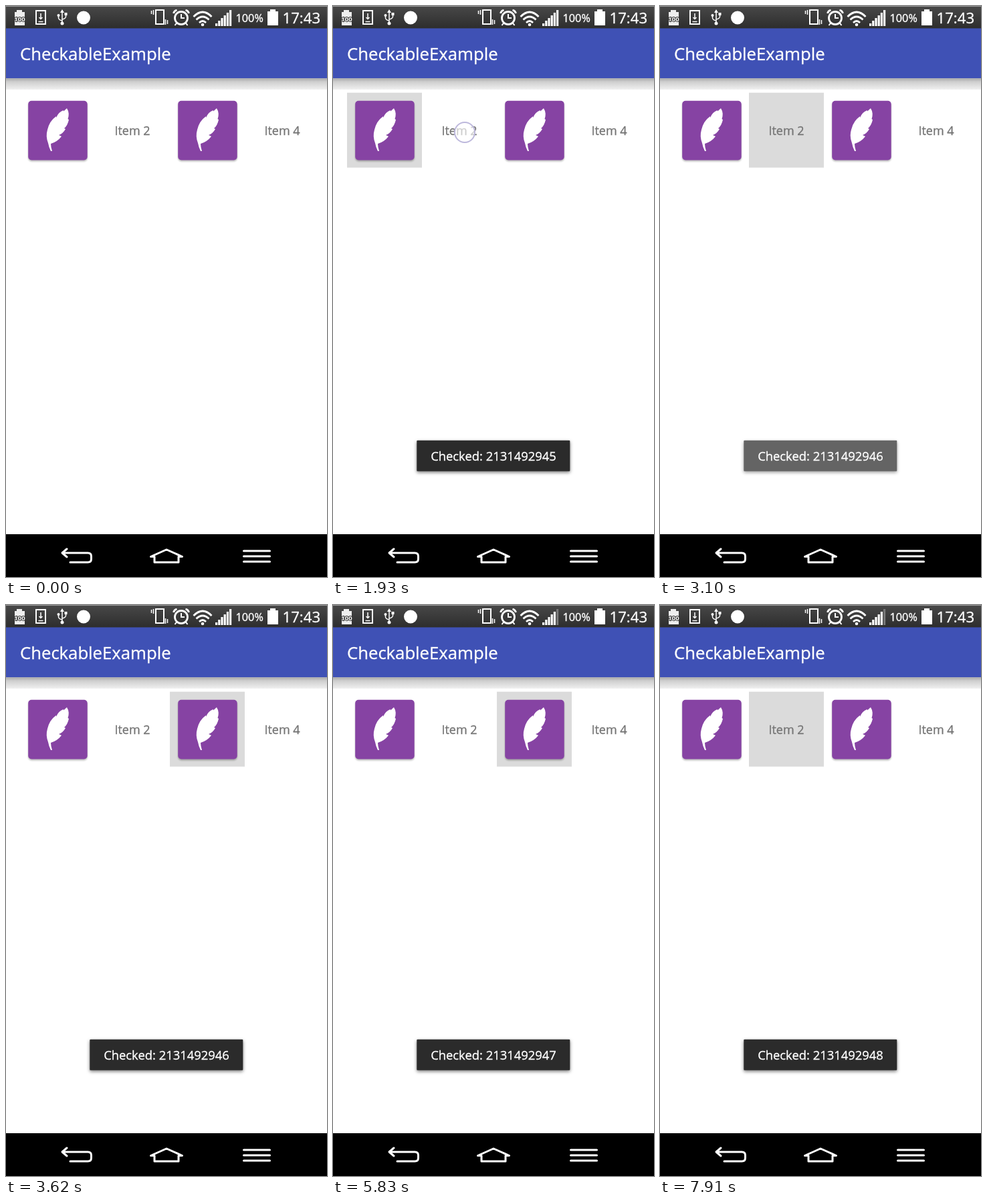
Write an HTML page that moves like this. It is 480 px wide and 854 px high and loops after 8 s.

```html
<!DOCTYPE html>
<html lang="en">
<head>
<meta charset="utf-8">
<title>Checkable items</title>
<style>
  html, body { margin: 0; width: 100%; height: 100%; overflow: hidden; background: #fff; }
  svg { display: block; width: 100%; height: 100%; font-family: "Open Sans", "Noto Sans", sans-serif; }
  .line { fill: none; stroke: #fff; stroke-width: 2; }
  .thin { stroke-width: 1.5; }
  .bold { stroke-width: 2.8; }
  .nav { fill: none; stroke: #fff; stroke-width: 3; stroke-linecap: round; stroke-linejoin: round; }
  .text { fill: #fff; stroke: #fff; stroke-width: .35; }
  .label { font-size: 18px; fill: #757575; stroke: #757575; stroke-width: .35; text-anchor: middle; }
  .card { filter: drop-shadow(0 2px 1px #0004); }
  .toast rect { fill: #2b2b2b; filter: drop-shadow(0 2px 2.5px #0008); }
  .toast text { font-size: 18.4px; text-anchor: middle; }
</style>
</head>
<body>
<svg viewBox="0 0 480 854">
  <defs>
    <linearGradient id="bar" x2="0" y2="1">
      <stop stop-color="#484848"/><stop offset="1" stop-color="#2d2d2d"/>
    </linearGradient>
    <linearGradient id="shade" x2="0" y2="1">
      <stop stop-color="#a8a8a8"/><stop offset=".3" stop-color="#cecece"/><stop offset="1" stop-color="#f0f0f0"/>
    </linearGradient>
    <g id="feather">
      <rect class="card" x="33.200" y="141.700" width="88.500" height="88.700" rx="5" fill="#8643a3"/>
      <path fill="#fff" d="M91 153Q95.500 160 92.500 169L94 170Q92 179 87 183L89 184Q85 191 79 193L83 195
        Q77 203 67 206Q67 211 69 217L67 217Q64 211 63 205Q59 195 62 185Q65 172 75 165L75 167Q79 158 86 156L86 157.500Z"/>
    </g>
  </defs>

  <rect width="480" height="34" fill="url(#bar)"/>
  <rect width="480" height="1" fill="#999"/>
  <rect y="33.400" width="480" height="74.800" fill="#3f51b5"/>
  <rect y="108.200" width="480" height="16.800" fill="url(#shade)"/>
  <text class="text" x="21" y="81" font-size="25.700">CheckableExample</text>

  <!-- status icons, left -->
  <path fill="#eee" d="M16 6h8v3h4v20h-15v-20h3z"/>
  <text x="20.500" y="22.500" font-size="9.500" font-weight="700" fill="#fff" stroke="#333" stroke-width="2"
    paint-order="stroke" text-anchor="middle">100</text>
  <path class="line" d="M45 7h14v20h-14z"/>
  <path class="line thin" d="M52 11v8M49.500 17l2.500 2.500l2.500-2.500M48.500 23.500h7"/>
  <path class="line thin" d="M84 9v16M84 22q-5-1-5.500-4v-3M84 20q5-1 5.500-4v-3"/>
  <path fill="#fff" d="M84 5l3 5h-6zM87.500 10h4v4h-4z"/>
  <circle cx="78.500" cy="14" r="2" fill="#fff"/>
  <circle cx="84" cy="26" r="2.500" fill="#fff"/>
  <circle cx="116" cy="17.500" r="10" fill="#fff"/>

  <!-- status icons, right -->
  <path class="line" d="M224 6h12v21h-12z"/>
  <path class="line thin" d="M217.500 7v5M220.500 6v7M238.500 20v8M241.500 21v6"/>
  <circle class="line bold" cx="262" cy="18" r="9.500"/>
  <path class="line" d="M262 12v6h5M255.500 25l-3 4M268.500 25l3 4"/>
  <path class="line bold" d="M250.500 11q1-4 5-5M273.500 11q-1-4-5-5"/>
  <path class="line bold" d="M280.500 16q13.500-14 27 0M284.500 20.500q9.500-9 19 0M289 25q5-5 10 0"/>
  <circle cx="294" cy="28" r="2.300" fill="#fff"/>
  <g id="signal" fill="#fff"></g>
  <text class="text" x="343.500" y="24" font-size="16.300">100%</text>
  <path fill="#fff" d="M395 5h8v3h4v21h-16v-21h4z"/>
  <text class="text" x="413.500" y="26" font-size="22.200">17:43</text>

  <!-- grid -->
  <rect id="mark" y="129.700" height="112" fill="#dbdbdb"/>
  <use href="#feather"/>
  <use href="#feather" x="224"/>
  <text class="label" x="189" y="193">Item 2</text>
  <text class="label" x="413" y="193">Item 4</text>

  <g id="toasts"></g>
  <circle id="touch" r="15" fill="#fff" fill-opacity=".65" stroke="#bdb8dc" stroke-width="2"/>

  <!-- navigation bar -->
  <rect y="790" width="480" height="64" fill="#000"/>
  <path class="nav" d="M91 812l-7 6l7 6M85 818h37.500q5 0 5 5v4q0 5-5 5h-26.500"/>
  <path class="nav" d="M216.500 823.500l23.500-10.500l23.500 10.500h-5.500v8.500h-36v-8.500z"/>
  <path class="nav" d="M355.500 815h39M355.500 823h39M355.500 831h39"/>
</svg>
<script>
  const $ = id => document.getElementById(id);
  const LOOP = 8000, FIRST = 500, STEP = 130, FADE = 300;

  // Touch: start, steps shown, x, y, column checked one step later
  const touches = [
    [500, 2, 77, 189, 0],
    [1930, 2, 197, 189, 1],
    [3230, 3, 299, 196, 2],
    [4400, 2, 413, 190, 3],
    [5570, 2, 301, 190, 2],
    [7650, 2, 191, 190, 1]
  ];
  // Toast: fade-in start, fade-out start
  const shows = [[690, 2560], [2956, 4600], [4900, 6680], [6980, 9000]];

  $('signal').innerHTML = [0, 1, 2, 3, 4, 5].map(i =>
    `<rect x="${313 + i * 4.2}" y="${26 - i * 4}" width="3.200" height="${4 + i * 4}"/>`).join('');
  $('toasts').innerHTML = shows.map((_, i) =>
    `<g class="toast"><rect x="125.300" y="649.700" width="229" height="46" rx="1"/>
     <text class="text" x="240" y="680">Checked: ${2131492945 + i}</text></g>`).join('');
  const toasts = [...$('toasts').children];
  const lastBar = $('signal').lastElementChild;
  const clamp = v => Math.max(0, Math.min(1, v));

  function draw(t) {
    shows.forEach(([start, end], i) => {
      const rise = 1 - (1 - clamp((t - start) / FADE)) ** 2;
      const fall = 1 - clamp((t - end) / FADE) ** 2;
      toasts[i].setAttribute('opacity', rise * fall);
    });

    let column = -1, alpha = 0;
    for (const [start, steps, x, y, col] of touches) {
      const age = (t - start) / STEP;
      if (age >= 1) column = col;
      if (age >= 0 && age < steps) {
        alpha = 1 - age / steps;
        $('touch').setAttribute('cx', x);
        $('touch').setAttribute('cy', y);
      }
    }
    $('touch').setAttribute('opacity', alpha);
    // The last column is cut off by the grid padding
    $('mark').setAttribute('x', 21 + 112 * column);
    $('mark').setAttribute('width', column < 0 ? 0 : column === 3 ? 102 : 112);
    lastBar.setAttribute('fill', t >= 5700 ? '#777' : '#fff');
  }

  function frame() {
    const t = performance.now() % LOOP;
    draw(t < FIRST ? 0 : FIRST + Math.floor((t - FIRST) / STEP) * STEP);
    requestAnimationFrame(frame);
  }
  frame();
</script>
</body>
</html>
```
